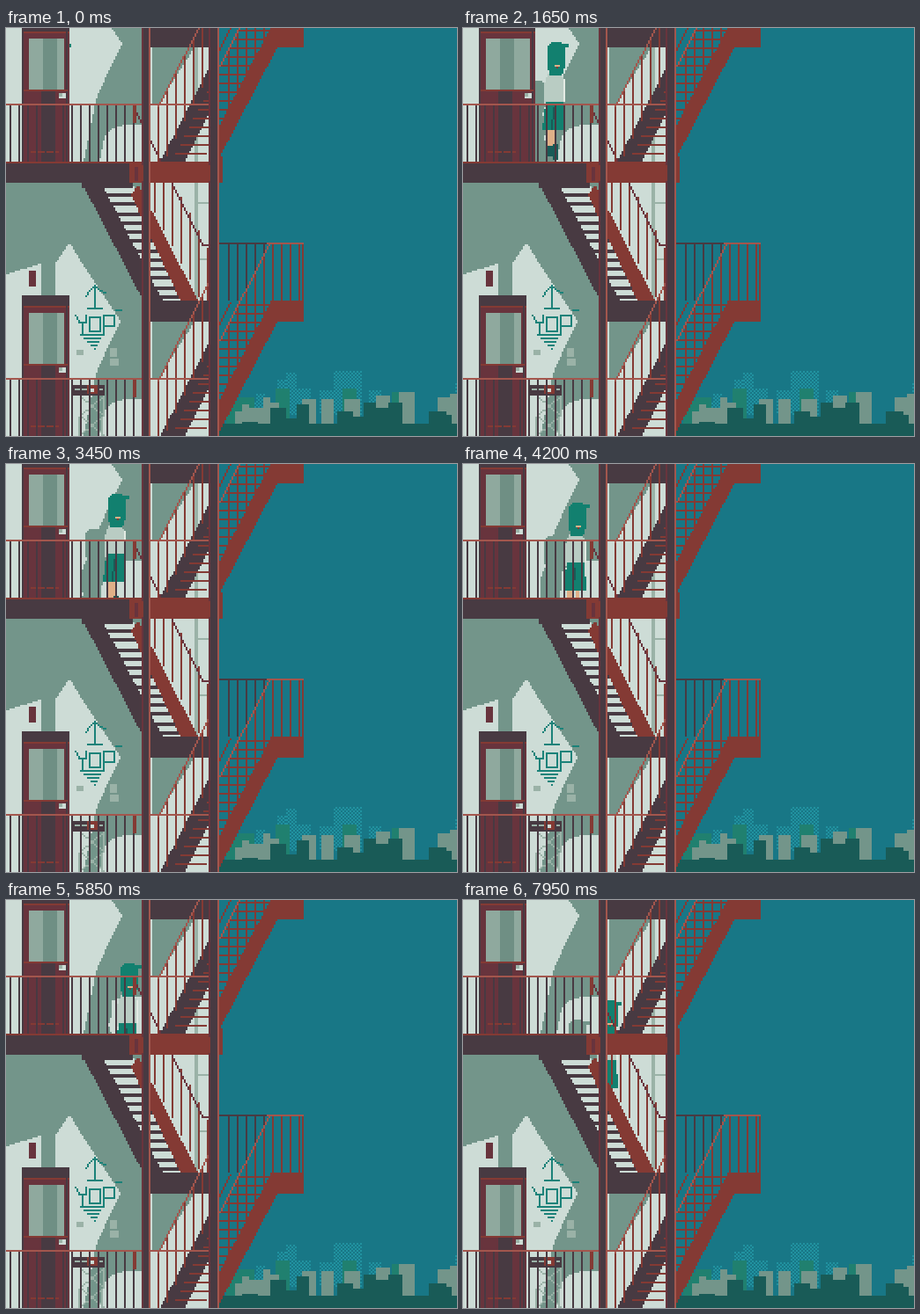
Write an HTML page with a canvas that moves like this. It is 512 by 464 pixels and loops after 8000 ms.

```html
<!DOCTYPE html>
<html lang="en">
<head>
<meta charset="utf-8">
<title>Fire escape</title>
<style>
html, body { margin: 0; width: 100%; height: 100%; overflow: hidden; background: #187786; }
canvas { display: block; width: 512px; height: 464px; image-rendering: pixelated; }
</style>
</head>
<body>
<canvas id="stage" width="512" height="464"></canvas>
<script>
const ctx = document.getElementById('stage').getContext('2d');
const SKY = '#187786', LIGHT = '#cddcd6', SHADE = '#73958a', DARK = '#483a42',
      RED = '#843a34', RAIL = '#a3564d', MAROON = '#68343d', TEAL = '#12806f',
      DEEP = '#195b57', MIST = '#9ab2a7', SHIRT = '#b9ccc3', SKIN = '#e0b088';
const LOOP = 8000, STEP = 150, FLOOR = 312, GAP = 10;
const SLOPE = 0.52; // sideways run of every flight per pixel of height

const even = v => Math.round(v / 2) * 2;

function box(color, x, y, x2, y2) {
  ctx.fillStyle = color;
  ctx.fillRect(even(x), even(y), even(x2) - even(x), even(y2) - even(y));
}

// Convex or concave polygon with hard edges on a two-pixel grid
function poly(color, ...p) {
  const n = p.length;
  const ys = p.filter((_, i) => i % 2);
  for (let y = even(Math.min(...ys)); y < Math.max(...ys); y += 2) {
    const cuts = [];
    for (let i = 0; i < n; i += 2) {
      const x1 = p[i], y1 = p[i + 1], x2 = p[(i + 2) % n], y2 = p[(i + 3) % n];
      if ((y1 <= y + 1) !== (y2 <= y + 1)) cuts.push(x1 + (y + 1 - y1) / (y2 - y1) * (x2 - x1));
    }
    cuts.sort((a, b) => a - b);
    for (let i = 0; i + 1 < cuts.length; i += 2) box(color, cuts[i], y, cuts[i + 1], y + 2);
  }
}

function path(color, ...p) {
  for (let k = 0; k + 3 < p.length; k += 2) {
    const [x1, y1, x2, y2] = p.slice(k, k + 4);
    const n = Math.max(1, Math.round(Math.max(Math.abs(x2 - x1), Math.abs(y2 - y1)) / 2));
    for (let i = 0; i <= n; i++) {
      const x = even(x1 + (x2 - x1) * i / n), y = even(y1 + (y2 - y1) * i / n);
      box(color, x, y, x + 2, y + 2);
    }
  }
}

// Evenly spaced upright bars; top and bottom are functions of x
function bars(color, from, to, top, bottom) {
  for (let x = from; x < to; x += GAP)
    if (bottom(x) > top(x)) box(color, x, top(x), x + 2, bottom(x));
}

// Linear interpolation through [time, value] pairs
function track(keys, t) {
  for (let i = 1; i < keys.length; i++) {
    const [a, va] = keys[i - 1], [b, vb] = keys[i];
    if (t <= b) return va + (vb - va) * Math.max(0, t - a) / (b - a);
  }
  return keys[keys.length - 1][1];
}

function seeded(seed) {
  return () => (seed = seed * 16807 % 2147483647) / 2147483647;
}

// One row of buildings: top edges between high and low, some plots left empty
function buildings(color, seed, high, low, share, checked) {
  const rnd = seeded(seed);
  for (let x = 244; x < 512;) {
    const w = even(6 + rnd() * 12);
    const sink = Math.max(0, 312 - x) * 0.2;
    const top = even(high + (low - high) * rnd() + sink);
    if (rnd() < share) {
      if (!checked) box(color, x, top, x + w, 452);
      else for (let y = top; y < 440; y += 2)
        for (let i = x + y % 4; i < x + w; i += 4) box(color, i, y, i + 2, y + 2);
    }
    x += w;
  }
}

function skyline() {
  buildings('#2192a0', 7919, 390, 416, 0.5, true);
  buildings('#20806f', 4421, 406, 424, 0.3);
  buildings(SHADE, 1237, 412, 430, 0.55);
  buildings(DEEP, 9311, 422, 444, 0.65);
  box(DEEP, 242, 450, 512, 464);
}

// Shade cast on one floor; the same on every storey
function floorShade(dy) {
  const at = (...p) => p.map((v, i) => i % 2 ? v + dy : v);
  poly(SHADE, ...at(120, 0, 156, 0, 156, 110, 136, 110, 120, 114, 112, 122, 106, 152,
    88, 152, 100, 92, 104, 76, 120, 42, 132, 18));
  poly(SHADE, ...at(166, 22, 214, 22, 172, 88, 166, 88));
}

function wall() {
  box(LIGHT, 0, 0, 232, 464);
  floorShade(0);
  floorShade(FLOOR);
  poly(SHADE, 0, 176, 156, 176, 156, 336, 132, 336, 84, 264, 72, 244, 56, 268, 40, 268, 0, 280);
  box(SHADE, 40, 266, 56, 304);
  box(MIST, 214, 22, 218, 310);
  box(MIST, 218, 198, 230, 200);
  box(MIST, 218, 262, 230, 264);
  box(MAROON, 26, 276, 34, 294);
  box(MIST, 80, 366, 88, 372);
  box(MIST, 118, 364, 126, 374);
  box(MIST, 118, 376, 128, 384);
}

function graffiti() {
  const c = '#1b8279';
  path(c, 90, 304, 94, 298, 100, 292, 106, 298, 112, 300);
  path(c, 100, 294, 100, 318);
  path(c, 92, 318, 108, 318);
  path(c, 78, 326, 82, 334, 90, 334, 90, 326);
  path(c, 86, 334, 86, 346);
  path(c, 94, 328, 106, 328, 106, 344, 94, 344, 94, 328);
  path(c, 110, 348, 110, 326, 122, 326, 122, 338, 110, 338);
  for (let i = 0; i < 5; i++) path(c, 84 + i * 4, 348 + i * 4, 108 - i * 2, 348 + i * 4);
  path(c, 124, 320, 130, 320);
}

function meter() {
  path(MIST, 82, 464, 84, 418, 110, 440, 84, 462);
  path(MIST, 108, 464, 110, 418, 84, 440, 110, 462);
  box(DARK, 76, 406, 112, 418);
  box(MIST, 78, 410, 110, 412);
  box(RED, 92, 406, 104, 416);
  box(LIGHT, 96, 410, 100, 414);
}

function door(y, right, dark) {
  const handle = right - 12;
  box(dark ? DARK : MAROON, 18, y - 8, right, y + 152);
  box(DARK, 18, y - 8, right, y + 4);
  box(RED, 18, y + 4, right, y + 6);
  box(DARK, 18, y, 20, y + 152);
  box(DARK, right - 4, y, right - 2, y + 152);
  box('#8fa99e', 26, y + 12, right - 6, y + 70);
  box('#6f8f84', 42, y + 12, 58, y + 70);
  if (!dark) box(DARK, 40, y + 72, 56, y + 152);
  box(RED, 20, y + 70, right - 2, y + 72);
  box(LIGHT, handle, y + 74, handle + 8, y + 80);
  box(MIST, handle, y + 74, handle + 4, y + 78);
  box(RED, 28, y + 140, 60, y + 142);
}

// x is the left side of the head, y its top; flat paints a silhouette
function girl(x, y, leg, flat) {
  const tint = c => flat || c;
  box(tint(SKIN), x - 2 + leg, y + 96, x + 4 + leg, y + 120);
  box(tint(SKIN), x + 8 - leg, y + 96, x + 12 - leg, y + 118);
  box(tint(DEEP), x - 2 + leg, y + 118, x + 4 + leg, y + 130);
  box(tint(DEEP), x + 8 - leg, y + 116, x + 14 - leg, y + 134);
  poly(tint(SHIRT), x, y + 36, x + 16, y + 36, x + 20, y + 50, x + 18, y + 72, x - 4, y + 72, x - 4, y + 50);
  poly(tint(TEAL), x - 2, y + 68, x + 18, y + 68, x + 20, y + 100, x - 6, y + 100);
  poly(tint(TEAL), x + 4, y, x + 16, y, x + 20, y + 6, x + 20, y + 26, x + 16, y + 38,
    x + 2, y + 38, x, y + 26, x, y + 6);
  box(tint(TEAL), x + 16, y + 2, x + 24, y + 6);
  if (flat) return;
  path(DEEP, x + 6, y + 74, x + 4, y + 98);
  path('#e3ebe4', x + 18, y + 42, x + 18, y + 66);
  box(SKIN, x + 8, y + 26, x + 14, y + 28);
  box(RED, x + 10, y + 28, x + 12, y + 30);
}

function flight(dy) {
  const near = y => 300 - SLOPE * (y - dy);        // upper edge of the front stringer
  const nearTop = x => dy + (300 - x) / SLOPE;
  const far = y => 254 - SLOPE * (y - dy);         // upper edge of the back stringer
  const rail = x => dy - 66 + (298 - x) / SLOPE;
  const backRail = x => dy - 27 + (232 - x) / SLOPE;
  const top = dy - 66, deck = dy - 2, foot = dy + 152;

  box(DARK, 164, deck, 232, dy + 22);
  poly(DARK, far(dy + 24), dy + 24, far(dy + 24), dy + 74, far(foot) + 28, foot, far(foot), foot);
  for (let y = dy + 2; y < foot; y += GAP) box(RED, far(y) + 12, y, near(y) + 2, y + 2);
  path(RED, far(dy), dy, far(dy + 30), dy + 30);
  bars(RED, 172, 230, backRail, x => Math.min(foot, backRail(x) + 76));
  path(RAIL, 232, dy - 27, 172, backRail(172));

  bars(DARK, 252, 298, () => top, () => deck);
  bars(RED, 302, 338, () => top, () => deck);
  bars(RED, 252, 298, rail, nearTop);
  poly(RED, near(deck), deck, 338, deck, 338, dy + 22, 308, dy + 22, 242, dy + 148, 242, nearTop(242));
  path(RAIL, 298, top, 242, rail(242));
  box(DARK, 242, top - 2, 298, top);
  box(RAIL, 296, top - 2, 338, top);
  box(RED, 336, top, 338, deck);
}

function crossFlight() {
  const run = y => (y - 176) * SLOPE;
  poly(LIGHT, 106, 180, 146, 180, 214, 310, 170, 310);
  poly(DARK, 86, 176, 108, 176, 108 + run(310), 310, 86 + run(310), 310);
  box(DARK, 86, 176, 144, 182);
  for (let y = 188; y < 310; y += GAP + 0.5) box(DARK, 104 + run(y), y, 142 + run(y), y + 4);
  bars(RED, 168, 230, x => Math.max(176, 176 + (x - 190) / SLOPE), x => Math.min(310, 206 + (x - 166) / SLOPE));
  poly(RED, 142, 190, 150, 178, 218, 310, 198, 310);
  path(MAROON, 144, 90, 222, 246, 232, 246);
}

function rail(y) {
  bars(DARK, 4, 156, () => y, () => y + 64);
  box(RAIL, 0, y - 2, 232, y);
  box(RED, 144, y, 148, y + 20);
}

function slab() {
  box(DARK, 0, 154, 142, 176);
  box(RED, 0, 152, 232, 154);
  box(RED, 140, 152, 232, 176);
  box(MAROON, 146, 158, 150, 174);
  box(RED, 242, 146, 246, 176);
}

function column(x, x2) {
  box(DARK, x, 0, x2, 464);
  box(MAROON, x, 0, x + 2, 464);
  box(RAIL, x2 - 2, 0, x2, 464);
  box(RED, x, 156, x + 2, 174);
}

const girlRight = [[0, 72], [1050, 108], [2100, 124], [3150, 137], [5250, 145], [7950, 178]];
const girlTop = [[2100, 16], [4950, 54], [7950, 114]];

function draw(frame) {
  const t = frame * STEP;
  const x = even(track(girlRight, t)) - 22, y = even(track(girlTop, t));
  const leg = Math.floor(frame / 2) % 2 * 2;
  const swing = t < 3000 ? Math.sin(Math.PI * t / 3000) ** 2 : 0;

  box(SKY, 0, 0, 512, 464);
  skyline();
  wall();
  graffiti();
  meter();

  // Her shadow trails on the wall and never leaves the landing
  ctx.save();
  ctx.beginPath();
  ctx.rect(72, 0, 82, 154);
  ctx.clip();
  girl(even(x * 0.77), even(y * 0.78 + 47), leg, SHADE);
  ctx.restore();
  girl(x, y, leg);

  door(0, 72 + 10 * swing, t >= 300 && t < 1200);
  door(FLOOR, 72, false);
  crossFlight();
  flight(0);
  flight(FLOOR);
  slab();
  rail(88);
  rail(88 + FLOOR);
  column(154, 164);
  column(230, 242);
}

let shown = -1;
function tick(now) {
  const frame = Math.floor(now % LOOP / STEP);
  if (frame !== shown) draw(shown = frame);
  requestAnimationFrame(tick);
}
tick(performance.now());
</script>
</body>
</html>
```
